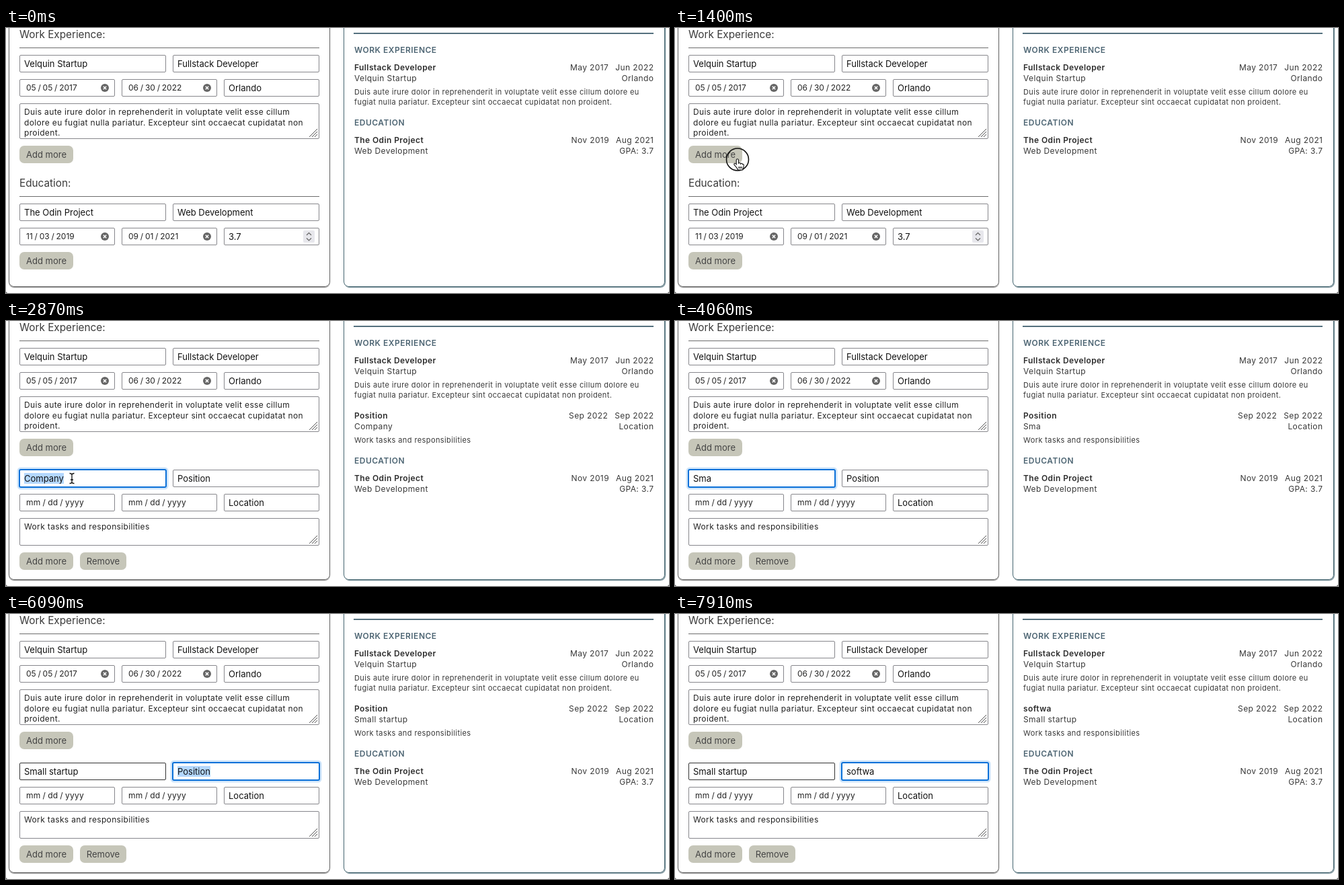
Recreate the animation shown at these times as an HTML page. Size 986x394 px, loop 8 s.

```html
<!DOCTYPE html>
<html lang="en">
<head>
<meta charset="utf-8">
<title>Resume builder</title>
<style>
html, body { margin: 0; width: 100%; height: 100%; overflow: hidden; background: #fff; }
#stage { position: relative; width: 986px; height: 394px; overflow: hidden; font: 13px Inter, sans-serif; color: #111; }
#stage div, #stage svg { position: absolute; box-sizing: border-box; }
.text { line-height: 20px; white-space: pre; }
.card { top: -20px; height: 405px; border: 1px solid #686868; border-radius: 8px; box-shadow: 0 1px 1px #888; }
.card.preview { border-color: #456570; box-shadow: 1px 1px 1px #6b858f; }
.rule { height: 1px; background: #6c6c6c; }
.box { border: 1px solid #87878c; border-radius: 2px; background: #fff; overflow: hidden; }
.box .text { left: 6px; }
.box.hover { border-color: #333; }
.box.focus { border-color: #0a70d8; box-shadow: 0 0 0 1px #0a70d8, 0 0 0 3.5px #cde4fa; }
.selected { background: #b3d7fe; }
.label { font-size: 15.3px; color: #3a3a3a; }
.button { height: 26px; border-radius: 7px; background: #c6c6b9; color: #444; line-height: 26px; text-align: center; }
.date { font-size: 12px; word-spacing: -.6px; color: #222; }
.blank { letter-spacing: .25px; }
.area { font-size: 12px; letter-spacing: .35px; color: #222; }
.pv { font-size: 12px; letter-spacing: .4px; color: #383838; }
.strong { font-weight: 600; color: #2c2c2c; }
.head { font-weight: 600; letter-spacing: .5px; color: #4d6573; }
.small { font-size: 11px; }
.gap { margin-left: 10px; }
#stage .group { left: 0; top: 0; width: 986px; height: 0; }
#scrollbar { left: 471px; top: -10px; width: 7px; height: 255px; border-radius: 4px; background: #7f7f7f; }
#overlay { left: 0; top: 0; }
</style>
</head>
<body>
<div id="stage"></div>
<script>
const $ = id => document.getElementById(id);
const LOOP = 8000;
const LEFT = 518, RIGHT = 963;

// Text is placed by the vertical centre of its capitals.
const text = (x, y, s, cls = '', id = '') =>
  `<div class="text ${cls}" id="${id}" style="left:${x}px;top:${y - 10}px">${s}</div>`;
const textEnd = (y, s, cls = 'pv') =>
  `<div class="text ${cls}" style="right:${986 - RIGHT - .4}px;top:${y - 10}px">${s}</div>`;
const box = (x, y, w, h, inner, id = '') =>
  `<div class="box" id="${id}" style="left:${x}px;top:${y}px;width:${w}px;height:${h}px">${inner}</div>`;
const line = (s, cls = '', y = 12) =>
  `<div class="text ${cls}" style="top:${y - 10}px">${s}</div>`;
const rule = (x, y, w, more = '') =>
  `<div class="rule" style="left:${x}px;top:${y}px;width:${w}px;${more}"></div>`;
const button = (x, y, w, s) =>
  `<div class="button" style="left:${x}px;top:${y}px;width:${w}px">${s}</div>`;
const svg = (x, y, w, h, inner) =>
  `<svg style="left:${x}px;top:${y}px" width="${w}" height="${h}" fill="none">${inner}</svg>`;

const pair = (y, a, b, idA, idB) =>
  box(20, y, 218, 26, line(a), idA) + box(248, y, 217.5, 26, line(b), idB);
const dateBox = (x, y, s) => {
  const blank = s.startsWith('mm');
  const clear = svg(119, 5, 14, 14,
    '<circle cx="7" cy="7" r="6" fill="#666"/><path d="M4.8 4.8l4.4 4.4m0-4.4l-4.4 4.4" stroke="#fff" stroke-width="1.5"/>');
  return box(x, y, 141.5, 26,
    `<div class="text date ${blank ? 'blank' : ''}" style="left:9px;top:2px">${s}</div>` + (blank ? '' : clear));
};
const triple = (y, from, to, last) =>
  dateBox(20, y, from) + dateBox(172, y, to) + box(324, y, 141.5, 26, last);
const area = (y, h, lines) =>
  box(20, y, 445.5, h,
    lines.map((s, i) => line(s, 'area', 12 + i * 15.5)).join('') +
    svg(429, h - 17, 14, 14, '<path d="M1 13L13 1M5 13l8-8M9 13l4-4" stroke="#555"/>'));

const job = (y, title, company, from, to, place, idTitle, idCompany) =>
  text(LEFT, y, title, 'pv strong', idTitle) + textEnd(y, `${from}<span class="gap">${to}</span>`) +
  text(LEFT, y + 16.2, company, 'pv', idCompany) + textEnd(y + 16.2, place);
const heading = (y, s) => text(LEFT, y, s, 'pv head');
const school = y => heading(y, 'EDUCATION') +
  job(y + 26, 'The Odin Project', 'Web Development', 'Nov 2019', 'Aug 2021', 'GPA: 3.7');
const group = (id, inner) => `<div class="group" id="${id}">${inner}</div>`;

const spinner = svg(117, 3, 18, 19,
  '<rect width="17" height="18" rx="2" fill="#e7e7ec"/><path d="M5 7l3.5-3.5L12 7M5 11.5L8.5 15l3.500-3.500" stroke="#666" stroke-width="1.2"/>');

$('stage').innerHTML =
  '<div class="card" style="left:4px;width:478px"></div>' +
  '<div class="card preview" style="left:501.500px;width:478px"></div>' +
  text(20, 10, 'Work Experience:', 'label') + rule(20, 29, 445.5) +
  pair(40, 'Velquin Startup', 'Fullstack Developer') +
  triple(76, '05 / 05 / 2017', '06 / 30 / 2022', line('Orlando')) +
  area(112, 53, [
    'Duis aute irure dolor in reprehenderit in voluptate velit esse cillum',
    'dolore eu fugiat nulla pariatur. Excepteur sint occaecat cupidatat non',
    'proident.']) +
  button(20, 175, 80, 'Add more') +
  rule(517, 7, 446, 'height:2px;background:#55717f') +
  heading(32.5, 'WORK EXPERIENCE') +
  job(58.5, 'Fullstack Developer', 'Velquin Startup', 'May 2017', 'Jun 2022', 'Orlando') +
  text(LEFT, 95, 'Duis aute irure dolor in reprehenderit in voluptate velit esse cillum dolore eu', 'pv small') +
  text(LEFT, 110, 'fugiat nulla pariatur. Excepteur sint occaecat cupidatat non proident.', 'pv small') +
  group('before',
    text(20, 231, 'Education:', 'label') + rule(20, 250, 445.5) +
    pair(261, 'The Odin Project', 'Web Development') +
    triple(297, '11 / 03 / 2019', '09 / 01 / 2021', line('3.7') + spinner) +
    button(20, 333, 80, 'Add more') + school(140.5)) +
  group('after',
    pair(221, '<span></span>', '<span></span>', 'company', 'position') +
    triple(257, 'mm / dd / yyyy', 'mm / dd / yyyy', line('Location')) +
    area(293, 41, ['Work tasks and responsibilities']) +
    button(20, 344, 80, 'Add more') + button(110, 344, 69, 'Remove') +
    job(140.5, '', '', 'Sep 2022', 'Sep 2022', 'Location', 'titleOut', 'companyOut') +
    text(LEFT, 177, 'Work tasks and responsibilities', 'pv small') + school(207.5)) +
  '<div id="scrollbar"></div>' +
  `<svg id="overlay" width="986" height="394">
    <path d="M0 391q0 3 3 3H0zM986 391q0 3-3 3h3z" fill="#444"/>
    <g id="cursor">
      <circle id="ring" r="16.500" fill="none" stroke="#111" stroke-width="1.6"/>
      <path id="arrow" d="M0 0v14l3.300-3.200 2.200 5.200 2.300-1-2.200-5.100h4.600z" fill="#000" stroke="#fff"/>
      <path id="hand" d="M-1.800 1q0-1.800 1.600-1.800T1.500 1v5.200q.3-1.200 1.600-1.200t1.500 1.400q.4-.8 1.500-.7 1.200.1 1.300 1.500 1.900-.6 1.900 1.400 0 3-1.500 5.300v1.600H.4q-.5-2-2.300-4.200-1.600-1.800-3-3.400-.8-1.600.6-2.100 1.300-.2 2.500 1.400z M2 10.500v3M4 10.500v3M6 10.500v3" fill="#fff" stroke="#111" stroke-width="1.1"/>
      <path id="beam" d="M-3.500-7.500Q0-7.500 0-5V5.500q0 2-3.500 2M3.500-7.500Q0-7.500 0-5V5.500q0 2 3.500 2M-2 2h4" fill="none" stroke="#111" stroke-width="1.3"/>
    </g>
  </svg>`;

const ADDED = 1470, FOCUS = 2310, TAB = 6090;
const fields = [
  { id: 'company', out: 'companyOut', blank: 'Company', value: 'Small startup', focus: [FOCUS, TAB], select: 2520,
    keys: [3220, 3850, 3990, 4130, 4270, 4340, 4620, 4760, 4900, 5110, 5320, 5810, 5950] },
  { id: 'position', out: 'titleOut', blank: 'Position', value: 'softwa', focus: [TAB, LOOP], select: TAB,
    keys: [6790, 6930, 7070, 7210, 7700, 7840] }
];
const path = [[70, 230, 340], [800, 93, 195.5], [1680, 93, 195.5], [2170, 98, 234], [LOOP, 98, 234]];
const clicks = [[1330, 1540], [2170, 2310], [2450, 2590]];

const within = (t, [a, b]) => t >= a && t < b;
const clamp = v => Math.min(1, Math.max(0, v));
const ease = v => v * v * (3 - 2 * v);
const show = (id, on) => { $(id).style.display = on ? '' : 'none'; };

function pointerAt(t) {
  const i = Math.max(1, path.findIndex(p => p[0] > t));
  const [a, b] = [path[i - 1], path[i]];
  const k = ease(clamp((t - a[0]) / (b[0] - a[0])));
  return [a[1] + (b[1] - a[1]) * k, a[2] + (b[2] - a[2]) * k];
}

function drawField(f, t, hovered) {
  const count = f.keys.filter(k => k <= t).length;
  const value = count ? f.value.slice(0, count) : f.blank;
  const el = $(f.id), span = el.querySelector('span');
  span.textContent = $(f.out).textContent = value;
  span.className = t >= f.select && !count ? 'selected' : '';
  el.classList.toggle('focus', within(t, f.focus));
  el.classList.toggle('hover', hovered);
}

function draw(t) {
  const [x, y] = pointerAt(t);
  const added = t >= ADDED;
  const overField = added && y > 221;
  const overButton = x < 100 && y < 201;
  show('before', !added);
  show('after', added);
  fields.forEach((f, i) => drawField(f, t, i === 0 && overField));
  $('scrollbar').style.opacity = added ? clamp((2800 - t) / 350) : 0;
  show('cursor', within(t, [70, 3220]));
  $('cursor').setAttribute('transform', `translate(${x} ${y})`);
  show('ring', clicks.some(c => within(t, c)));
  show('beam', overField);
  show('hand', !overField && overButton);
  show('arrow', !overField && !overButton);
}

const start = performance.now();
function tick() {
  draw((performance.now() - start) % LOOP);
  requestAnimationFrame(tick);
}
tick();
</script>
</body>
</html>
```
